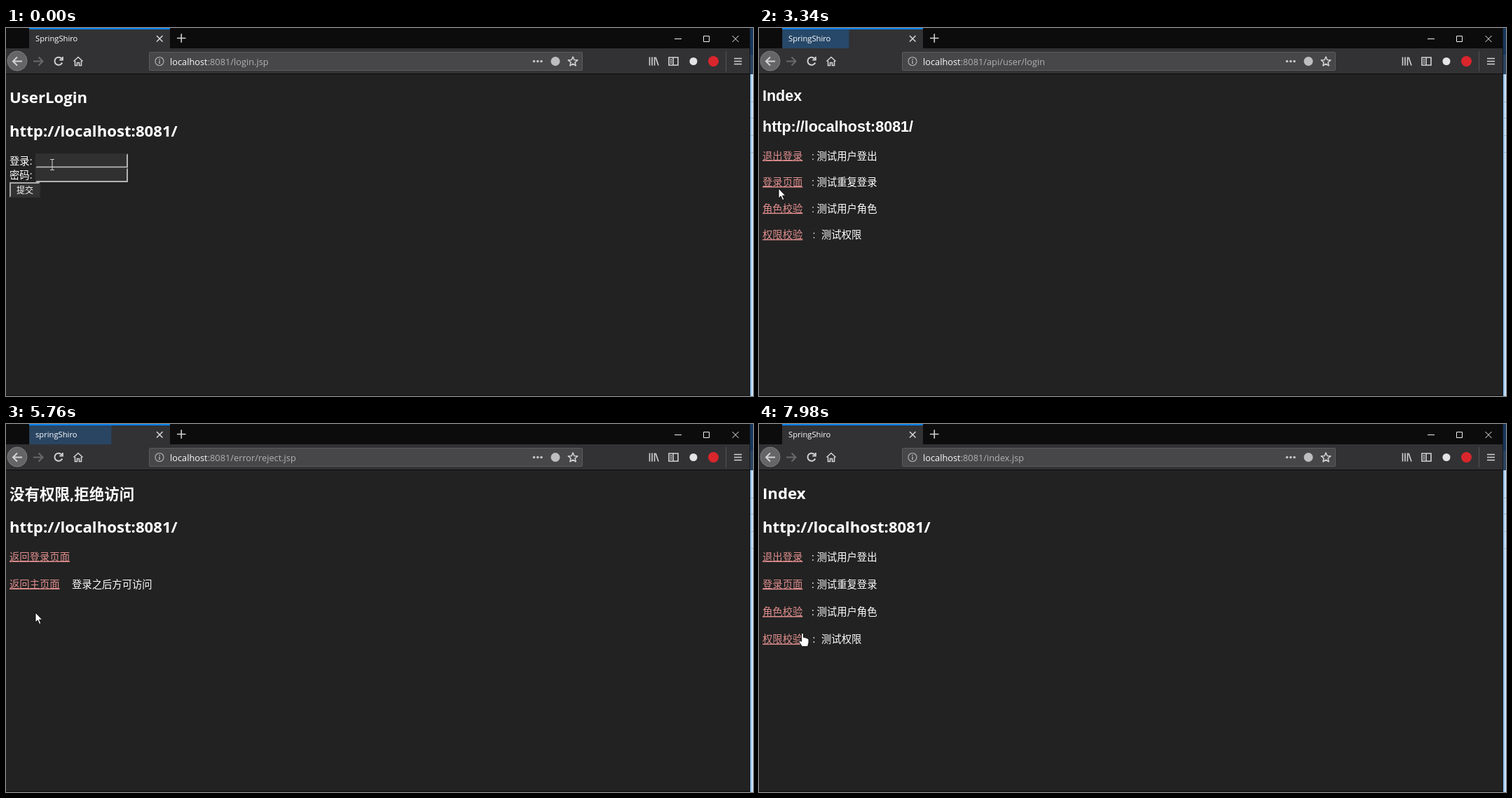
Recreate the animation shown at these times as an HTML page. Size 1066 by 525 pixels, loop 8000 ms.

```html
<!DOCTYPE html>
<html lang="zh-CN">
<head>
<meta charset="utf-8">
<title>SpringShiro</title>
<style>
html, body { margin: 0; width: 100%; height: 100%; overflow: hidden; background: #222; }
svg { display: block; width: 100%; height: 100%; }
text { font: 14.33px "Open Sans", "Noto Sans CJK SC", "Noto Sans CJK", sans-serif; fill: #fff; white-space: pre; }
.arial text { font-family: "Liberation Sans", "Noto Sans CJK SC", "Noto Sans CJK", sans-serif; }
text.h { font-size: 22.2px; font-weight: 700; }
.arial text.h, text.zh { font-size: 21.5px; font-weight: 700; }
text.link { fill: #e08e8e; text-decoration: underline; text-decoration-skip-ink: none; }
text.link.active { fill: #f03030; }
text.ui { font-size: 11.2px; }
text.btn { font-size: 12px; }
text.url { font-size: 12.8px; fill: #b1b1b3; }
.host { fill: #f9f9fa; }
#list text { fill: #000; }
#list text.lit { fill: #fff; }
.line { fill: none; stroke: #d2d2d4; stroke-width: 1.6; }
.thin { fill: none; stroke: #f0f0f0; stroke-width: 1; }
.bold { stroke-width: 2; }
.dim { stroke: #69696b; }
.focus { fill: none; stroke: #e08e8e; stroke-width: 1; stroke-dasharray: 1 1; }
</style>
</head>
<body>
<svg id="stage" viewBox="0 0 1066 525" xmlns="http://www.w3.org/2000/svg"></svg>
<script>
const LOOP = 8000;
const users = ['lena@home.test', 'petra@home.test', 'amy@home.test'];

const text = (x, y, s, cls = '', id = '') => `<text x="${x}" y="${y}" class="${cls}" id="${id}">${s}</text>`;
const rect = (x, y, w, h, fill, more = '') => `<rect x="${x}" y="${y}" width="${w}" height="${h}" fill="${fill}" ${more}/>`;
const disc = (x, y, r, fill, more = '') => `<circle cx="${x}" cy="${y}" r="${r}" fill="${fill}" ${more}/>`;
const path = (d, cls = 'line', more = '') => `<path d="${d}" class="${cls}" ${more}/>`;
const group = (id, body, cls = '') => `<g id="${id}" class="${cls}">${body}</g>`;
const focusBox = (id, x, y, w, h) => group(id, rect(x + .5, y + .5, w, h, 'none', 'class="focus"'));

function star(cx, cy, r) {
  const pts = Array.from({ length: 10 }, (_, i) => {
    const a = -Math.PI / 2 + i * Math.PI / 5, q = i % 2 ? r * .45 : r;
    return (cx + q * Math.cos(a)).toFixed(1) + ' ' + (cy + q * Math.sin(a)).toFixed(1);
  });
  return path('M' + pts.join('L') + 'Z', 'line', 'stroke-linejoin="round"');
}

// Window frame, tab and toolbar
const frame =
  rect(0, 0, 1066, 525, '#222') +
  rect(0, 0, 1062, 29, '#0c0c0d') +
  rect(33, 0, 201, 30, '#323234') +
  rect(0, 29, 1062, 36, '#323234') +
  rect(0, 65, 1062, 1, '#0d0d0e') +
  rect(0, 524, 1062, 1, '#0d0d0e') +
  rect(1061, 0, 1, 525, '#17181a') +
  rect(1062, 0, 4, 38, '#16365c') +
  rect(1062, 38, 4, 28, '#2a4360') +
  rect(1062, 66, 2, 459, '#8fc1ea') +
  rect(1064, 66, 2, 459, '#cfe4f6') +
  [105, 128, 153, 177].map(y => rect(1062, y, 4, 1, '#9fb0c0')).join('') +
  rect(33.5, 0, 0, 29, '#0a84ff', 'id="burst"') +
  rect(33, 0, 201, 2, '#0a84ff') +
  text(42, 19, '', 'ui', 'title') +
  path('M215 11l8.5 8.5M223.5 11l-8.5 8.5') +
  path('M244 14.5h12.5M250.25 8.25v12.5') +
  path('M954 15.5h10M995.5 11.5h8v8h-8zM1036.5 11l9 9M1045.5 11l-9 9', 'thin') +
  disc(16, 47, 14, '#656567', 'stroke="#7d7d7f"') +
  path('M23 47.5H10M16 41.5l-6 6 6 6', 'line bold') +
  path('M39 47.5h13M46.5 41.5l6 6-6 6', 'line bold dim') +
  path('M79.5 43.8A5.6 5.6 0 1 0 80.2 49.5M80.8 41v4.5h-4.5', 'line bold') +
  path('M96.5 47.5l6.5-6 6.5 6M98.5 47v6.5h3v-4h3v4h3V47') +
  rect(204.5, 34.5, 618, 26, '#474749', 'stroke="#5b5b5d" rx="1"') +
  disc(219, 47.5, 6, 'none', 'stroke="#b1b1b3" stroke-width="1.2"') +
  rect(218.3, 46.5, 1.5, 4.5, '#b1b1b3') + rect(218.3, 43.7, 1.5, 1.6, '#b1b1b3') +
  text(234, 52.5, '<tspan class="host">localhost</tspan><tspan id="url"></tspan>', 'url') +
  [753.5, 758.8, 764].map(x => disc(x, 47.5, 1.8, '#c4c4c6')).join('') +
  disc(784, 47.5, 6.5, '#bebec0') +
  star(809, 48, 7) +
  path('M918.5 41.5v12M922 41.5v12M925.5 41.5v12M927 41.8l4 11.7') +
  path('M946 42h13v11h-13zM952 42v11M948 45h2M948 47.5h2M948 50h2') +
  disc(981, 47.5, 5.5, '#e4e4e4') +
  disc(1009.5, 47.5, 7.5, '#d9262c') +
  rect(1027, 33, 1, 29, '#545456') +
  path('M1039 43.5h11M1039 47.5h11M1039 51.5h11');

const field = y =>
  rect(42, y, 132, 20.5, '#303030') +
  path(`M42 ${y + 20.5}l2-2H172V${y + 2}l2-2V${y + 20.5}z`, '', 'fill="#b4b4b4"');

const key = y => path(`M48.5 ${y + 5}l6.5-6.5`, '', 'stroke="#555" stroke-width="2.4"') +
  path(`M50 ${y + 4}l1.6 1.6`, '', 'stroke="#555" stroke-width="1.6"') +
  disc(56.5, y - 3, 3.6, '#555') + disc(57.7, y - 4.2, .9, '#fff');

const login = group('login',
  text(5, 107, 'UserLogin', 'h') + text(5, 155, 'http://localhost:8081/', 'h') +
  text(5, 194.5, '登录:') + text(5, 215, '密码:') +
  field(179) + field(199.5) +
  rect(5, 220, 44, 22, '#333') +
  path('M5 242V220H49l-2 2H7V240z', '', 'id="bevel" fill="#aaa"') +
  path('M49 220V242H5l2-2H47V222z', '', 'id="bevel2" fill="#303030"') +
  text(15, 236, '提交', 'btn') +
  group('filled', text(44.5, 194, users[1], 'ui') +
    Array.from({ length: 6 }, (_, i) => disc(48 + i * 7.3, 211, 2.8, '#f2f2f2')).join('')) +
  rect(45, 182, 1, 15, '#f2f2f2', 'id="caret"') +
  group('list', rect(43, 200, 131.5, 54.5, '#000', 'opacity=".35"') +
    rect(41.5, 198.5, 131, 55, '#fff', 'stroke="#b8b8b8"') +
    rect(42, 218, 130, 18, '#0078d7', 'id="hover"') +
    users.map((u, i) => key(209 + 18 * i) + text(64, 213 + 18 * i, u, 'ui', 'user' + i)).join('')));

const items = [['退出登录', '测试用户登出'], ['登录页面', '测试重复登录'], ['角色校验', '测试用户角色'], ['权限校验', '测试权限']];

// The index page has two layouts that differ in font and line pitch
const index = (id, cls, top, url, first, pitch) => group(id,
  text(5, top, 'Index', 'h') + text(5, url, 'http://localhost:8081/', 'h') +
  items.map(([a, b], i) => {
    const y = first + pitch * i, last = i === 3;
    return text(5, y, a, 'link', id + 'Link' + i) +
      text(last ? 76.5 : 75, y, ':') + text(last ? 89 : 82.5, y, b);
  }).join(''), cls);

const reject = group('reject',
  text(5, 108, '没有权限,拒绝访问', 'zh') + text(5, 155, 'http://localhost:8081/', 'h') +
  text(5, 194.5, '返回登录页面', 'link') +
  text(5, 233.5, '返回主页面', 'link', 'homeLink') +
  text(94, 233.5, '登录之后方可访问') + focusBox('homeFocus', 4, 219, 73, 19));

const white = 'fill="#fff" stroke="#000" stroke-width=".9" stroke-linejoin="round"';
const pointer = group('pointer',
  group('A', path('M0 0V14L3.2 11 5.6 16.5 7.9 15.5 5.5 10.2H9.8Z', '', white)) +
  group('H', path('M-1.5 1Q0-.6 1.5 1V6.5Q4 5.6 4.5 7.2 6.4 6.4 7 8 9 7.6 9 10V14L7.5 19.5H-.5L-5 12.5Q-4.5 10-1.5 12.3Z', '', white)) +
  group('I', path('M-3-7.5h2.5l.5.6.5-.6h2.5M0-7v14M-3 7.5h2.5l.5-.6.5.6h2.5', '', 'fill="none" stroke="#c8c8c8" stroke-width="1.1"')));

const stage = document.getElementById('stage');
stage.innerHTML = frame + login +
  index('home', 'arial', 104, 148, 187.5, 37.6) + reject + index('index', '', 107, 155, 194.5, 39.3) +
  focusBox('roleFocus', 4, 246, 59, 20) + pointer;

const el = id => document.getElementById(id);
const show = (id, on) => el(id).style.display = on ? '' : 'none';
const between = (t, a, b) => t >= a && t < b;

// Pointer paths: start, end, shape, then points spread evenly over the steps
const moves = [
  [0, 0, 'I', 66, 195],
  [900, 970, 'I', 67, 194, 68, 194],
  [1120, 1250, 'A', 84, 212, 112, 240, 140, 265],
  [1410, 1930, 'A', 136, 264, 135, 260, 133, 255, 130, 249, 126, 243, 122, 237, 118, 232, 116, 230],
  [2070, 2290, 'A', 115, 229, 115, 229, 114, 229, 112, 229],
  [2430, 2580, 'A', 104, 230, 80, 231, 55, 232],
  [2670, 2870, 'A', 40, 232, 33, 232, 29, 231, 28, 229],
  [4110, 4270, 'A', 28, 233, 28, 240, 28, 247],
  [4320, 4320, 'A', 28, 250],
  [4400, 4560, 'H', 27, 254, 27, 255],
  [4780, 4780, 'H', 28, 256],
  [5540, 5540, 'H', 30, 257],
  [5620, 5760, 'A', 34, 262, 39, 266, 42, 269],
  [5970, 5970, 'A', 40, 263],
  [6130, 6203, 'A', 36, 250, 31, 239],
  [6275, 6275, 'H', 28, 230],
  [6348, 6421, 'A', 45, 205, 80, 172],
  [6494, 6494, 'A', 115, 128],
  [6566, 6639, 'I', 150, 105, 172, 102],
  [6712, 6857, 'A', 150, 128, 120, 175, 100, 210],
  [6930, 6930, 'I', 90, 227],
  [7010, 7090, 'A', 66, 239, 40, 243],
  [7240, 7240, 'A', 38, 240],
  [7305, 7370, 'H', 32, 233, 27, 227],
  [7680, 7980, 'H', 32, 238, 42, 258, 52, 280, 59, 293, 62, 298]
];
const steps = moves.flatMap(([a, b, kind, ...p]) => {
  const n = p.length / 2;
  return Array.from({ length: n }, (_, i) => ({ t: n > 1 ? a + (b - a) * i / (n - 1) : a, x: p[2 * i], y: p[2 * i + 1], kind }));
});

const pages = [
  [0, 'login', 'SpringShiro', ':8081/login.jsp'],
  [3180, 'home', 'SpringShiro', ':8081/api/user/login'],
  [5620, 'reject', 'springShiro', ':8081/error/reject.jsp'],
  [7680, 'index', 'SpringShiro', ':8081/index.jsp']
];
const bursts = [[3210, [3260, 3340, 3420, 3560]], [5600, [5620, 5690, 5760, 5850, 5970]], [7630, [7680, 7755, 7830, 7905, 7980]]];
const at = (list, t, time) => list.reduce((found, row) => time(row) <= t ? row : found, null);

// Blue glow that spreads along the tab after a page has loaded
function drawBurst(t) {
  const load = at(bursts, t, b => b[0]);
  const held = load && at(load[1], t, v => v);
  const u = held ? (held - load[0]) / 375 : 1;
  const on = u < .9;
  el('burst').setAttribute('width', on ? Math.min(200, 274 * u) : 0);
  el('burst').setAttribute('opacity', on ? .4 * (1 - u) : 0);
}

function draw(t) {
  const [, page, title, url] = at(pages, t, p => p[0]);
  pages.forEach(p => show(p[1], p[1] === page));
  el('title').textContent = title;
  el('url').textContent = url;
  drawBurst(t);

  const hover = between(t, 2070, 2220);
  show('list', between(t, 130, 2220));
  show('hover', hover);
  el('user1').classList.toggle('lit', hover);
  show('filled', t >= 2220);
  const late = between(t, 2220, 2650);
  show('caret', late || between(t, 130, 590) || between(t, 1120, 1632));
  el('caret').setAttribute('x', late ? 133 : 45);
  const pressed = t >= 3100;
  el('bevel').setAttribute('fill', pressed ? '#303030' : '#aaa');
  el('bevel2').setAttribute('fill', pressed ? '#aaa' : '#303030');

  show('roleFocus', between(t, 5400, 5620));
  el('homeLink2').classList.toggle('active', between(t, 5400, 5540));
  show('homeFocus', t >= 7600);
  el('homeLink').classList.toggle('active', t >= 7600);

  const p = at(steps, t, s => s.t);
  el('pointer').setAttribute('transform', `translate(${p.x} ${p.y})`);
  ['A', 'H', 'I'].forEach(k => show(k, k === p.kind));
}

const start = performance.now();
function tick() {
  draw((performance.now() - start) % LOOP);
  requestAnimationFrame(tick);
}
tick();
</script>
</body>
</html>
```
